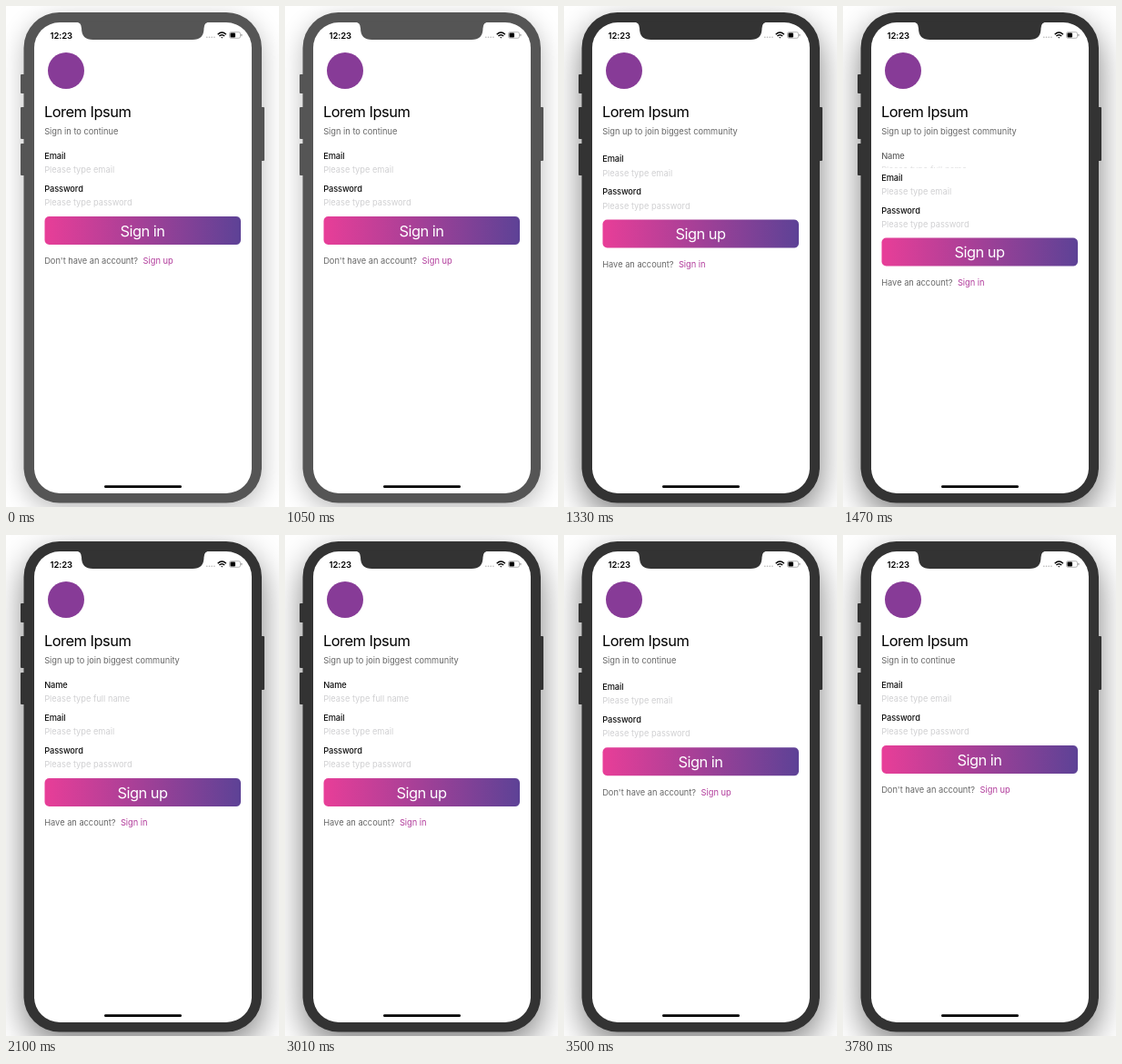
Animation, 300 px wide and 550 px high, one loop 4270 ms. Source, as an HTML page:

```html
<!DOCTYPE html>
<html lang="en">
<head>
<meta charset="utf-8">
<title>Sign in form</title>
<style>
  html, body { margin: 0; width: 100%; height: 100%; overflow: hidden; background: #fff; }
  svg { display: block; width: 300px; height: 550px; }
  text { font: 400 9.25px Inter, "Liberation Sans", sans-serif; fill: #666; }
  .title { font-size: 16.4px; letter-spacing: -.03em; fill: #000; }
  .label { font-weight: 500; letter-spacing: -.01em; fill: #111; }
  .hint { fill: #d0d0d2; }
  .action { font-size: 16.4px; letter-spacing: -.03em; fill: #fff; text-anchor: middle; }
  .link { fill: #b13b9b; }
  .clock { font-size: 9.5px; font-weight: 600; letter-spacing: -.01em; fill: #000; }
</style>
</head>
<body>
<svg viewBox="0 0 300 550">
  <defs>
    <linearGradient id="pink">
      <stop stop-color="#e83e98"/>
      <stop offset="1" stop-color="#5d4296"/>
    </linearGradient>
    <clipPath id="rowClip"><rect id="rowArea" x="40" y="150" width="220" height="5"/></clipPath>
  </defs>

  <rect id="shadow" x="20" y="7" width="261" height="538" rx="39"/>
  <g id="shell">
    <rect x="16" y="75" width="6" height="21" rx="1"/>
    <rect x="16" y="111" width="6" height="35" rx="1"/>
    <rect x="16" y="151" width="6" height="35" rx="1"/>
    <rect x="278" y="111" width="6" height="59" rx="1"/>
    <rect x="19.5" y="7" width="261.5" height="538.5" rx="39"/>
    <rect x="31" y="18" width="239" height="517" rx="28" fill="#fff"/>
    <path d="M76 17.5 q7 0 7 7 q0 12.5 12.5 12.5 H205 q12.5 0 12.5 -12.5 q0 -7 7 -7z"/>
  </g>

  <text class="clock" x="48.5" y="35.6">12:23</text>
  <g fill="#b5b5b5">
    <circle cx="220.8" cy="34.3" r=".8"/><circle cx="223.5" cy="34.3" r=".8"/>
    <circle cx="226.2" cy="34.3" r=".8"/><circle cx="228.9" cy="34.3" r=".8"/>
  </g>
  <g fill="none" stroke="#000" stroke-width="1.4">
    <path d="M232.7 31.2 q4.6 -4.2 9.2 0 M234.4 33.1 q2.9 -2.7 5.8 0"/>
    <path d="M236 34.3 h2.6 l-1.3 1.3z" fill="#000" stroke="none"/>
  </g>
  <rect x="245.5" y="28.7" width="12" height="6.6" rx="1.8" fill="none" stroke="#999" stroke-width=".7"/>
  <rect x="246.5" y="29.6" width="5.5" height="4.8" rx="1"/>
  <rect x="258.4" y="30.8" width="1" height="2.4" rx=".5" fill="#999"/>

  <circle cx="66" cy="71" r="20" fill="#873b97"/>
  <text class="title" x="42" y="122.4">Lorem Ipsum</text>
  <text id="subtitle" x="42.2" y="141.4"></text>

  <g clip-path="url(#rowClip)">
    <g id="nameRow">
      <text class="label" x="42.2" y="168">Name</text>
      <text class="hint" x="42.2" y="183.2">Please type full name</text>
    </g>
  </g>

  <g id="lower">
    <text class="label" x="42.2" y="168">Email</text>
    <text class="hint" x="42.2" y="183.2">Please type email</text>
    <text class="label" x="42.2" y="204">Password</text>
    <text class="hint" x="42.2" y="219.2">Please type password</text>
    <rect x="42.5" y="231" width="215.5" height="31" rx="5" fill="url(#pink)"/>
    <text id="action" class="action" x="150" y="252.9"></text>
    <text x="42.2" y="283.4"><tspan id="question"></tspan><tspan id="link" class="link" dx="5.5"></tspan></text>
  </g>

  <rect x="108" y="526.3" width="85" height="2.8" rx="1.4"/>
</svg>
<script>
  const LOOP = 4270, STEP = 70, ROW = 36, SLIDE = 350;
  const FOCUS = 1190, OPEN = 1260, CLOSE = 3206;
  const $ = id => document.getElementById(id);

  const signIn = { subtitle: "Sign in to continue", action: "Sign in",
                   question: "Don't have an account?", link: "Sign up" };
  const signUp = { subtitle: "Sign up to join biggest community", action: "Sign up",
                   question: "Have an account?", link: "Sign in" };

  const ease = (t, start) => {
    const p = Math.min(1, Math.max(0, (t - start) / SLIDE));
    return (1 - Math.cos(Math.PI * p)) / 2;
  };

  function setCopy(copy) {
    for (const id in copy)
      if ($(id).textContent !== copy[id]) $(id).textContent = copy[id];
  }

  function setFocus(active) {
    $("shell").setAttribute("fill", active ? "#333" : "#555");
    $("shadow").style.cssText = active
      ? "filter: blur(18px); opacity: .5; transform: translateY(14px)"
      : "filter: blur(14px); opacity: .27; transform: translateY(8px)";
  }

  let wasActive;
  function draw(now) {
    const t = Math.floor((now % LOOP) / STEP) * STEP;
    const open = ease(t, OPEN) - ease(t, CLOSE);
    const active = t >= FOCUS;

    if (active !== wasActive) setFocus(wasActive = active);
    setCopy(t >= OPEN && t < CLOSE ? signUp : signIn);
    $("nameRow").style.opacity = open;
    $("rowArea").setAttribute("height", 4.5 + ROW * open);
    $("lower").setAttribute("transform", `translate(0 ${ROW * open})`);
  }

  const begin = performance.now();
  function tick() {
    draw(performance.now() - begin);
    requestAnimationFrame(tick);
  }
  tick();
</script>
</body>
</html>
```
